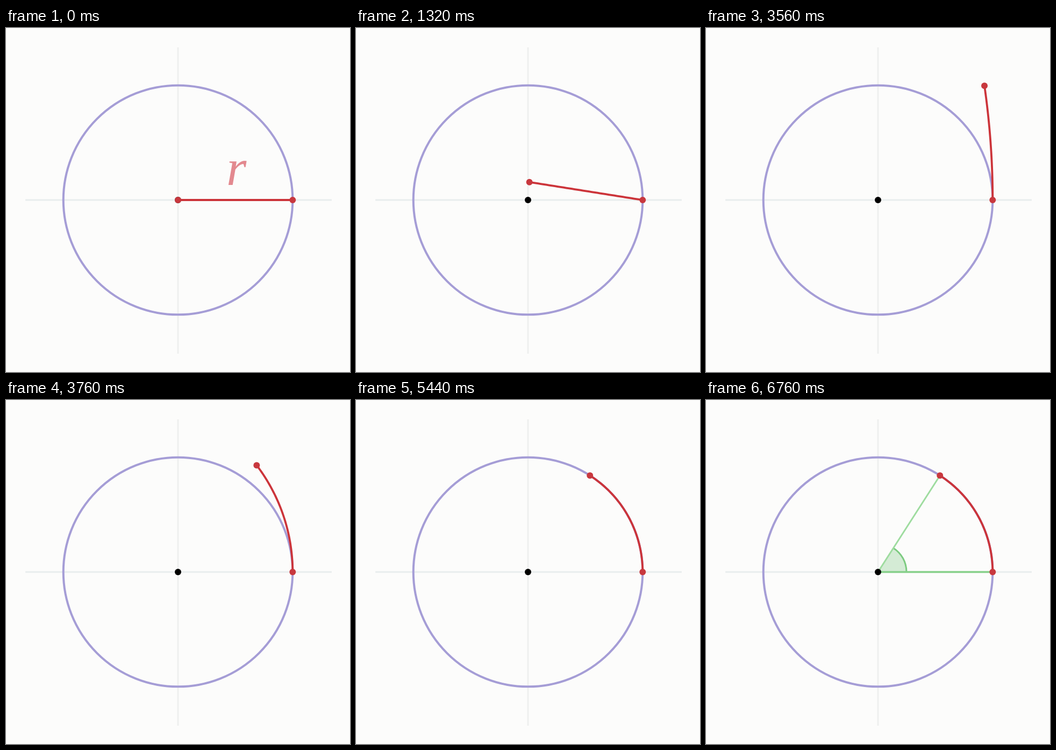
An HTML page with a canvas for the animation above (8000 ms loop, 640 by 640 pixels).

```html
<!DOCTYPE html>
<html lang="en">
<head>
<meta charset="utf-8">
<title>One radian</title>
<style>
html, body { margin: 0; width: 100%; height: 100%; overflow: hidden; background: #fcfcfb; }
canvas { display: block; width: 100vw; height: 100vh; }
</style>
</head>
<body>
<canvas id="stage" width="640" height="640"></canvas>
<script>
const LOOP = 8000, C = 320, R = 213.3, TAU = Math.PI * 2;
const RED = '#cc343a', GREEN = '#6cc974';
const ctx = document.getElementById('stage').getContext('2d');

const progress = (t, from, to) => Math.min(1, Math.max(0, (t - from) / (to - from)));
const cubicOut = p => 1 - (1 - p) ** 3;
const cubicInOut = p => p < .5 ? 4 * p ** 3 : 1 - 4 * (1 - p) ** 3;

function path(points, color, width) {
  ctx.beginPath();
  for (const [x, y] of points) ctx.lineTo(x, y);
  ctx.strokeStyle = color;
  ctx.lineWidth = width;
  ctx.stroke();
}

function dot(x, y, color) {
  ctx.beginPath();
  ctx.arc(x, y, 6, 0, TAU);
  ctx.fillStyle = color;
  ctx.fill();
}

// Point at share s of a strip of length R that leaves the rim and turns by bend in all
function stripPoint(s, heading, bend) {
  const half = bend * s / 2;
  const chord = R * s * (half ? Math.sin(half) / half : 1);
  return [C + R + chord * Math.cos(heading + half), C - chord * Math.sin(heading + half)];
}

function angleMark(alpha) {
  ctx.globalAlpha = alpha;
  ctx.beginPath();
  ctx.moveTo(C, C);
  ctx.arc(C, C, 53, 0, -1, true);
  ctx.fillStyle = 'rgba(108, 190, 116, .28)';
  ctx.fill();
  ctx.beginPath();
  ctx.arc(C, C, 53, 0, -1, true);
  ctx.strokeStyle = '#7ccb80';
  ctx.lineWidth = 3;
  ctx.stroke();
  path([[C, C], [C + R * Math.cos(1), C - R * Math.sin(1)]], '#9edc9f', 3);
  path([[C, C], [C + R, C]], '#86d08a', 3.5);
  ctx.globalAlpha = 1;
}

function draw(t) {
  ctx.fillStyle = '#fcfcfb';
  ctx.fillRect(0, 0, 640, 640);
  path([[36, C], [606, C]], '#e9eded', 3);
  path([[C, 36], [C, 606]], '#eeefef', 3);

  ctx.beginPath();
  ctx.arc(C, C, R, 0, TAU);
  ctx.strokeStyle = '#a59dd6';
  ctx.lineWidth = 4;
  ctx.stroke();

  angleMark(progress(t, 5920, 6280));
  dot(C, C, '#000');

  const heading = Math.PI * (1 - cubicInOut(progress(t, 1120, 1808)) / 2);
  const bend = cubicOut(progress(t, 3520, 4335));
  const strip = Array.from({ length: 41 }, (_, i) => stripPoint(i / 40, heading, bend));
  path(strip, RED, 3.8);
  dot(...strip[0], '#c8383e');
  dot(...strip[40], '#c8383e');

  ctx.globalAlpha = .6 * (1 - progress(t, 40, 640));
  ctx.fillStyle = '#d23c48';
  ctx.font = 'italic 96px "Liberation Serif", serif';
  ctx.fillText('r', 410, 292);
  ctx.globalAlpha = 1;
}

function tick() {
  draw(performance.now() % LOOP);
  requestAnimationFrame(tick);
}
tick();
</script>
</body>
</html>
```
